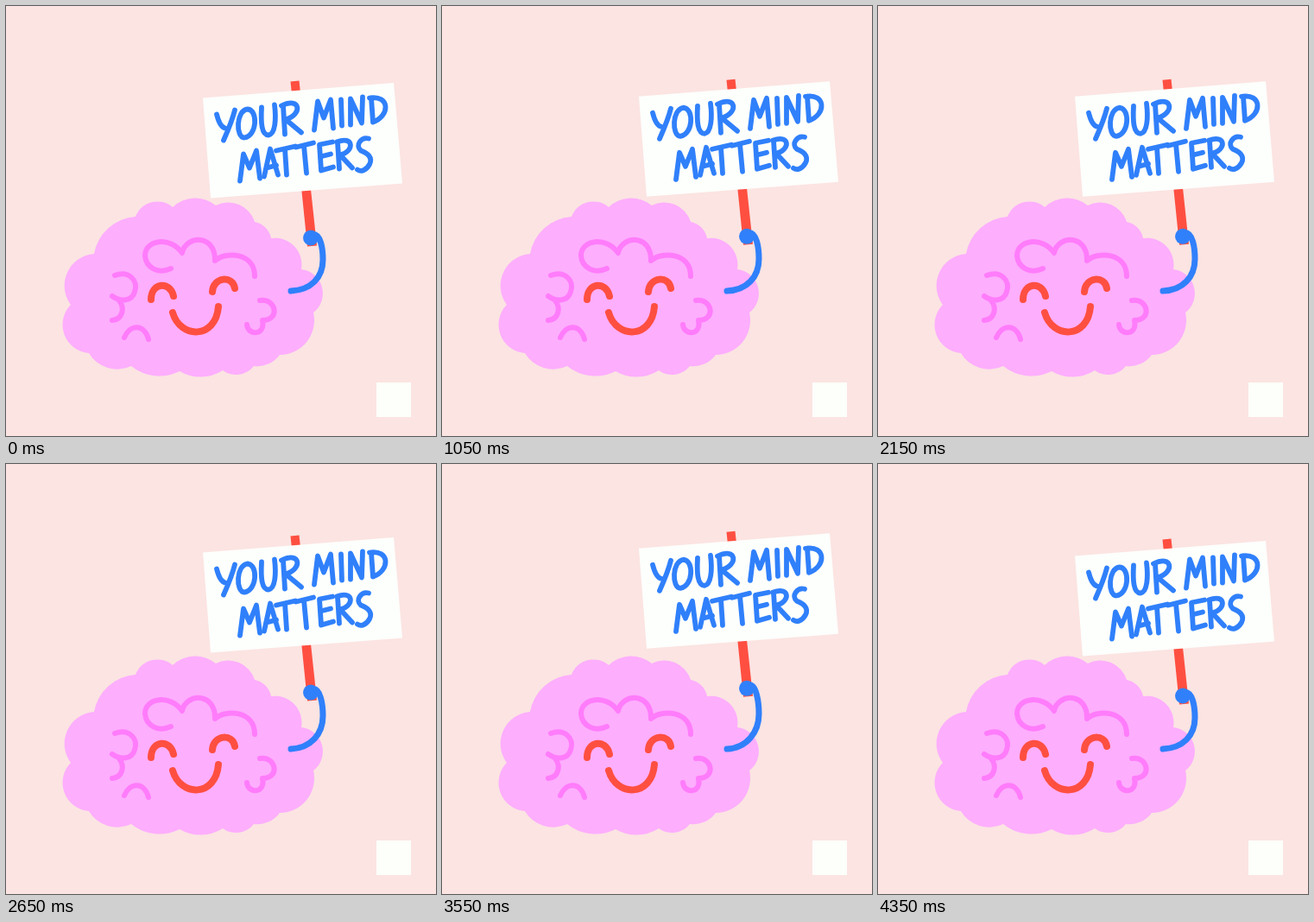
These frames come from a looping animation (498x498 px, 4.4 s). An HTML page:

```html
<!DOCTYPE html>
<html lang="en">
<head>
<meta charset="utf-8">
<title>Your mind matters</title>
<style>
  html, body { margin: 0; width: 100%; height: 100%; overflow: hidden; background: #fbe4e2; }
  svg { display: block; width: 100vw; height: 100vh; }
  .line { fill: none; stroke-linecap: round; stroke-linejoin: round; }
  .fold { stroke: #ff7cfb; stroke-width: 6; }
  .face { stroke: #ff4f41; stroke-width: 8; }
  .ink { stroke: #3080fb; stroke-width: 5.8; }
  .limb { stroke: #3080fb; stroke-width: 7; }
</style>
</head>
<body>
<svg viewBox="0 0 498 498" role="img" aria-label="Your mind matters">
  <rect width="498" height="498" fill="#fbe4e2"/>
  <rect x="429" y="436" width="40" height="40" fill="#fdfffb"/>

  <path fill="#fdaefd" d="M75 346A37 37 0 0 1 102 287A52 52 0 0 1 150 244A27 27 0 0 1 193 233
    A38 38 0 0 1 243 231A32 32 0 0 1 288 250A24 24 0 0 1 307 269A31 31 0 0 1 342 305
    A28 28 0 0 1 356 355A40 40 0 0 1 317 404A32 32 0 0 1 287 417A26 26 0 0 1 251 422
    A48 48 0 0 1 201 423A52 52 0 0 1 145 417A38 38 0 0 1 96 402A33 33 0 0 1 75 346Z"/>
  <g class="line fold">
    <path d="M191 304C176 311 162 303 161 289C161 271 190 266 204 286C208 265 243 264 242 295C254 284 288 285 288 313"/>
    <path d="M126 312C142 306 154 318 149 331C146 342 133 343 123 336M131 341C138 350 135 363 123 364"/>
    <path d="M137 384C143 369 160 367 165 386"/>
    <path d="M294 341C313 338 318 364 297 364C301 382 280 382 279 369"/>
  </g>
  <g class="line face">
    <path d="M168 340C168 320 190 318 194 336"/>
    <path d="M239 331C240 313 263 312 265 327"/>
    <path d="M193 355C202 386 243 386 246 348"/>
  </g>

  <g id="sign">
    <path fill="#ff4f41" d="M329.500 88L339.500 87L360 278L349 279Z"/>
    <path fill="#fdfffc" d="M228 107L449 89.500L459 206L237 223Z"/>
    <g class="line ink">
      <!-- YOUR -->
      <path d="M244 126C246 134 249 141 254 142M265 121C262 133 256 147 252 156"/>
      <path d="M280 120C266 121 266 153 276 153C291 151 292 121 280 120"/>
      <path d="M296 118C295 136 296 150 304 150C312 149 313 131 311 115"/>
      <path d="M321 116L323 149M319 116C341 105 344 126 324 132L342 147"/>
      <!-- MIND -->
      <path d="M357 144L361 111L368 130L376 109L379 142"/>
      <path d="M388 109L389 139"/>
      <path d="M399 138L399 108L412 136L413 106"/>
      <path d="M423 107L425 135M421 107C445 103 445 128 425 135"/>
      <!-- MATTERS -->
      <path d="M271 203L275 172L282 188L290 168L294 200"/>
      <path d="M299 198L306 166L315 196M302 188L313 185"/>
      <path d="M313 168L335 163M323 166L325 196"/>
      <path d="M336 164L356 159M345 162L348 194"/>
      <path d="M378 158L363 161L365 191L379 187M364 175L376 172"/>
      <path d="M384 158L386 189M383 158C403 150 404 169 387 173L401 188"/>
      <path d="M420 154C411 152 404 162 411 168C419 171 425 176 421 184C417 191 411 193 407 190"/>
    </g>
    <circle cx="353" cy="269" r="9" fill="#3080fb"/>
  </g>
  <path id="arm" class="line limb"/>
</svg>
<script>
  // The sign bobs once every 13 drawings, drawn at 24 a second and shown at 20.
  const LOOP = 4400, STEP = 50, RATE = 24, CYCLE = 13;
  const MID = -4.6, REACH = 4.9, LOWEST = 1.2;
  const sign = document.getElementById('sign');
  const arm = document.getElementById('arm');

  function draw(time) {
    const shown = Math.floor((time % LOOP) / STEP);
    const drawing = Math.floor(shown * STEP * RATE / 1000);
    const lift = MID + REACH * Math.cos(2 * Math.PI * (drawing - LOWEST) / CYCLE);
    const hand = 265 + lift, elbow = 294 + lift / 2;
    sign.setAttribute('transform', `translate(0 ${lift.toFixed(2)})`);
    arm.setAttribute('d', `M356 ${hand}C364 ${hand} 367 ${elbow - 14} 367 ${elbow}C367 ${elbow + 21} 353 329 330 330`);
  }

  const start = performance.now();
  function tick() {
    draw(performance.now() - start);
    requestAnimationFrame(tick);
  }
  draw(0);
  requestAnimationFrame(tick);
</script>
</body>
</html>
```
